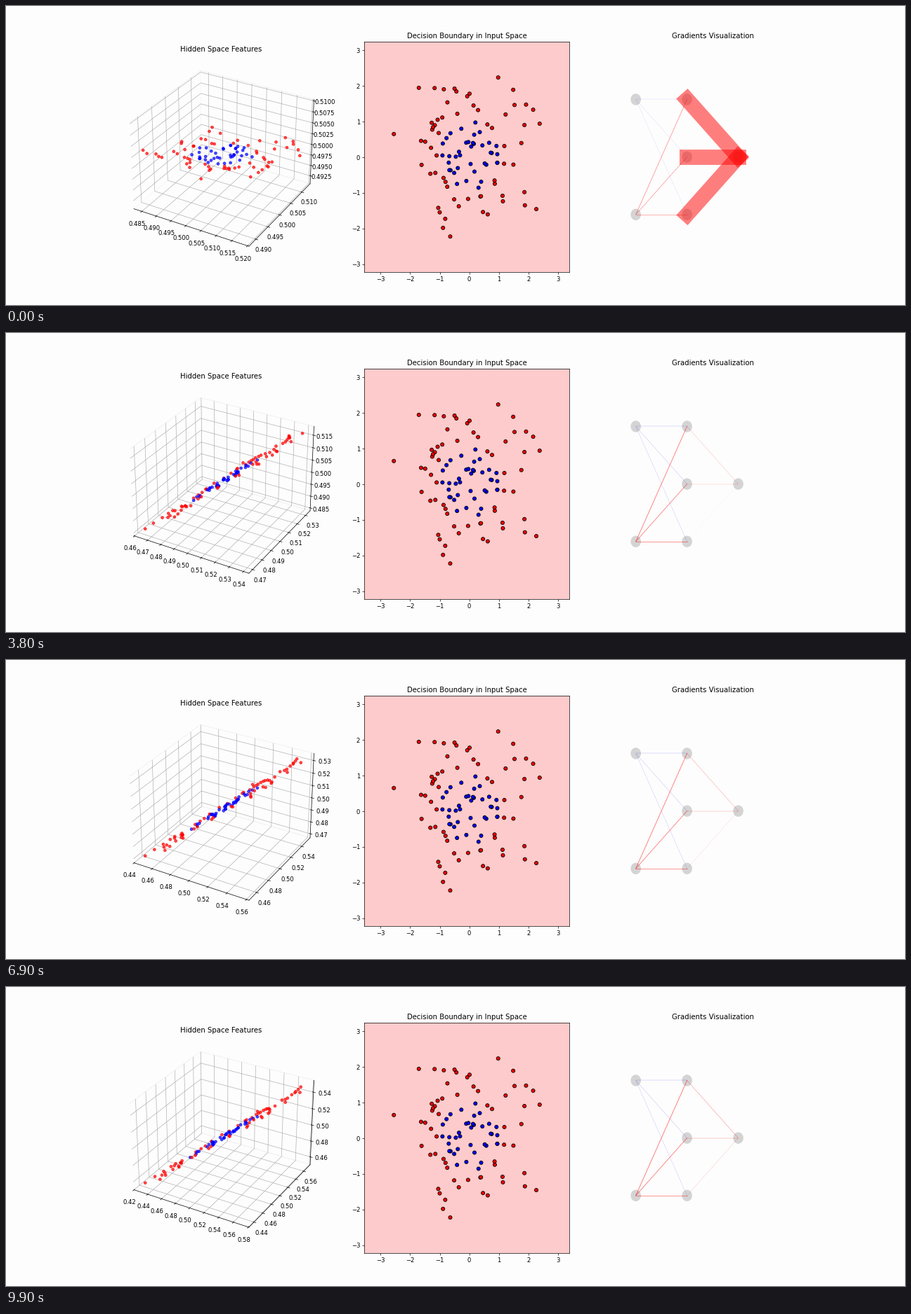
A matplotlib script that plays this animation: 1280 by 427 pixels, repeating every 10 s.

```python
import numpy as np
import matplotlib.pyplot as plt
from matplotlib.animation import FuncAnimation
from matplotlib.patches import Circle

DPI = 1280 / 21
PAPER = "#fdfdfd"
FRAMES, STEPS = 100, 10
RATE, LINE_SCALE = 0.1, 1000


def sigmoid(z):
    return 1 / (1 + np.exp(-z))


def make_data(n=100):
    np.random.seed(0)
    x = np.random.randn(n, 2)
    return x, ((x ** 2).sum(axis=1) > 1).astype(float).reshape(-1, 1)


def train(x, y):
    """Hidden features and weight updates after every block of steps."""
    np.random.seed(0)
    w1 = np.random.randn(2, 3) * 0.01
    w2 = np.random.randn(3, 1) * 0.01
    b1, b2 = np.zeros((1, 3)), np.zeros((1, 1))
    history = []
    for step in range(1, (FRAMES + 1) * STEPS + 1):
        hidden = sigmoid(x @ w1 + b1)
        err = (y - sigmoid(hidden @ w2 + b2)) / len(x)
        back = err @ w2.T * hidden * (1 - hidden)
        g1, g2 = x.T @ back, hidden.T @ err
        w1 += RATE * g1
        w2 += RATE * g2
        b1 += RATE * back.sum(axis=0)
        b2 += RATE * err.sum()
        if step % STEPS == 0 and step > STEPS:
            history.append((hidden, np.append(g1.ravel(), g2.ravel())))
    return history


X, Y = make_data()
history = train(X, Y)
labels = Y.ravel()

# A hair of slack keeps the pixel size from rounding down.
fig = plt.figure(figsize=(1280.001 / DPI, 427.001 / DPI), dpi=DPI, facecolor=PAPER)
ax_hidden = fig.add_subplot(131, projection="3d", facecolor=PAPER)
ax_input = fig.add_subplot(132, facecolor="#fdcbcb")
ax_grad = fig.add_subplot(133)

# Input space
ax_input.scatter(X[:, 0], X[:, 1], c=labels, cmap="bwr", edgecolors="k")
ax_input.set_xlim(X[:, 0].min() - 1, X[:, 0].max() + 1)
ax_input.set_ylim(X[:, 1].min() - 1, X[:, 1].max() + 1)
ax_input.set_title("Decision Boundary in Input Space")

# Network
inputs = [(0, 1), (0, 0)]
hiddens = [(0.5, 1), (0.5, 0.5), (0.5, 0)]
output = (1, 0.5)
for node in inputs + hiddens + [output]:
    ax_grad.add_patch(Circle(node, 0.05, color="#d4d4d4", lw=0))
pairs = [(a, b) for a in inputs for b in hiddens] + [(h, output) for h in hiddens]
edges = [ax_grad.plot(*zip(a, b), alpha=0.5)[0] for a, b in pairs]
ax_grad.set_xlim(-0.25, 1.75)
ax_grad.set_ylim(-0.5, 1.5)
ax_grad.axis("off")
ax_grad.set_title("Gradients Visualization")


def update(i):
    hidden, grads = history[i]
    ax_hidden.clear()
    for axis in (ax_hidden.xaxis, ax_hidden.yaxis, ax_hidden.zaxis):
        axis.pane.set(facecolor=PAPER, edgecolor="#f0f0f0", alpha=1)
    ax_hidden.scatter(*hidden.T, c=labels, cmap="bwr", alpha=0.7)
    ax_hidden.set_title("Hidden Space Features")
    for edge, g in zip(edges, grads):
        edge.set(linewidth=abs(g) * LINE_SCALE, color="red" if g > 0 else "blue")


anim = FuncAnimation(fig, update, frames=FRAMES, interval=100,
                     init_func=lambda: update(0), repeat=True)
plt.show()
```
